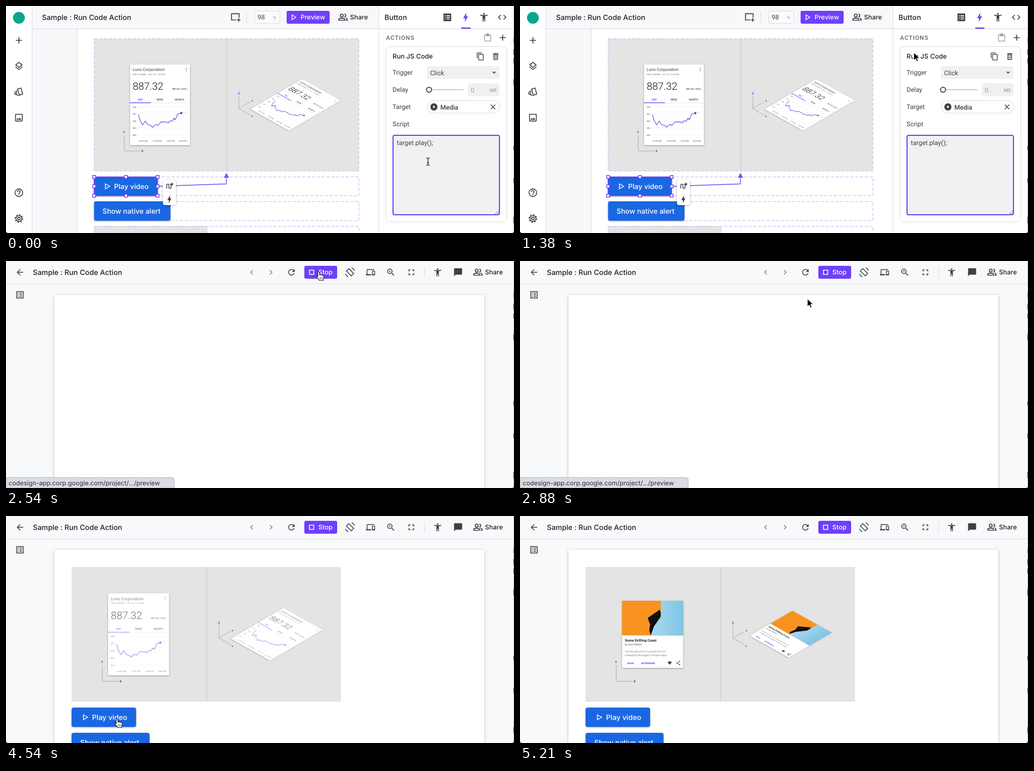
Animation of 945x423 px, one loop 5250 ms. Source, as an HTML page:

```html
<!DOCTYPE html>
<html lang="en">
<head>
<meta charset="utf-8">
<title>Run code action</title>
<style>
  html, body { margin: 0; width: 100%; height: 100%; overflow: hidden; background: #fff; }
  svg { display: block; width: 100vw; height: 100vh; }
  text { font-family: Roboto, sans-serif; fill: #3c4043; white-space: pre; text-rendering: geometricPrecision; }
  .ui { font-family: Inter, sans-serif; font-weight: 500; fill: #202124; }
  .white { fill: #fff; }
  .line { fill: none; stroke: #3c4043; stroke-width: 2; }
  .dash { fill: none; stroke: #c6b8f1; stroke-dasharray: 6 3; }
  .lift { filter: drop-shadow(0 1px 1.5px rgba(0,0,0,.35)); }
  .soft { filter: drop-shadow(0 1px 2px rgba(0,0,0,.28)); }
</style>
</head>
<body>
<svg id="stage" viewBox="0 0 945 423" preserveAspectRatio="none"></svg>
<script>
const LOOP = 5250;
const PURPLE = '#6f3ffb', HOVER = '#9059fb', BLUE = '#1a67e2', INK = '#3c4043', RULE = '#dadce0';

const icons = {
  add: 'M19 13h-6v6h-2v-6H5v-2h6V5h2v6h6z',
  layers: 'M12 18.5l-7.4-5.7L3 14l9 7 9-7-1.6-1.2zM12 16l7.4-5.7L21 9l-9-7-9 7 1.6 1.3zm0-11.5L17.7 9 12 13.5 6.3 9z',
  image: 'M19 5v14H5V5h14m0-2H5c-1.1 0-2 .9-2 2v14c0 1.1.9 2 2 2h14c1.1 0 2-.9 2-2V5c0-1.1-.9-2-2-2zm-4.9 8.9l-3 3.9L9 13.1 6 17h12z',
  help: 'M11 18h2v-2h-2zm1-16a10 10 0 1 0 0 20 10 10 0 0 0 0-20zm0 18a8 8 0 1 1 0-16 8 8 0 0 1 0 16zm0-14a4 4 0 0 0-4 4h2c0-1.1.9-2 2-2s2 .9 2 2c0 2-3 1.75-3 5h2c0-2.25 3-2.5 3-5a4 4 0 0 0-4-4z',
  bolt: 'M10 21l1-7H7c-.5 0-.4-.4 0-1l6-10h1l-1 7h3.5c.5 0 .6.3.4.7L11 21z',
  person: 'M20.5 6c-2.6.7-5.7 1-8.5 1s-5.9-.3-8.5-1L3 8c1.9.5 4 .8 6 1v13h2v-6h2v6h2V9c2-.2 4.1-.5 6-1zM12 6a2 2 0 1 0 0-4 2 2 0 0 0 0 4z',
  code: 'M9.4 16.6L4.8 12l4.6-4.6L8 6l-6 6 6 6zm5.2 0l4.6-4.6-4.6-4.6L16 6l6 6-6 6z',
  copy: 'M16 1H4c-1.1 0-2 .9-2 2v14h2V3h12zm3 4H8c-1.1 0-2 .9-2 2v14c0 1.1.9 2 2 2h11c1.1 0 2-.9 2-2V7c0-1.1-.9-2-2-2zm0 16H8V7h11z',
  trash: 'M15.5 4l-1-1h-5l-1 1H5v2h14V4zM6 7v12c0 1.1.9 2 2 2h8c1.1 0 2-.9 2-2V7zm2 2h8v10H8zm1.5 1.5v7h1.5v-7zm3.500 0v7h1.5v-7z',
  paste: 'M19 3h-4a3 3 0 0 0-6 0H5c-1.1 0-2 .9-2 2v15c0 1.100.9 2 2 2h14c1.100 0 2-.9 2-2V5c0-1.100-.9-2-2-2zm0 17H5V5h2v3h10V5h2z',
  list: 'M3 3h18v18H3zM6 7v2h2V7zm4 0v2h8V7zm-4 4v2h2v-2zm4 0v2h8v-2zm-4 4v2h2v-2zm4 0v2h8v-2z',
  listOutline: 'M3 3h18v18H3zm2 2v14h14V5zm2 2h2v2H7zm4 0h6v2h-6zm-4 4h2v2H7zm4 0h6v2h-6zm-4 4h2v2H7zm4 0h6v2h-6z',
  back: 'M20 11H7.8l5.600-5.600L12 4l-8 8 8 8 1.400-1.400L7.800 13H20z',
  prev: 'M15.4 7.4L14 6l-6 6 6 6 1.4-1.4-4.6-4.6z',
  next: 'M10 6L8.6 7.4l4.6 4.6-4.6 4.6L10 18l6-6z',
  refresh: 'M17.65 6.35A8 8 0 1 0 19.7 14h-2.100A6 6 0 1 1 16.200 7.800L13 11h7V4z',
  devices: 'M4 6h18V4H4c-1.1 0-2 .9-2 2v11H0v3h14v-3H4zm19 2h-6q-1 0-1 1v10q0 1 1 1h6q1 0 1-1V9q0-1-1-1zm-1 9h-4v-7h4z',
  zoom: 'M15.5 14h-.8l-.3-.3a6.500 6.500 0 1 0-.7.7l.3.3v.8l5 5 1.500-1.500zm-6 0a4.500 4.500 0 1 1 0-9 4.500 4.500 0 0 1 0 9zm2.500-4h-2v2H9v-2H7V9h2V7h1v2h2z',
  full: 'M7 14H5v5h5v-2H7zm-2-4h2V7h3V5H5zm12 7h-3v2h5v-5h-2zM14 5v2h3v3h2V5z',
  chat: 'M20 2H4c-1.1 0-2 .9-2 2v18l4-4h14c1.1 0 2-.9 2-2V4c0-1.1-.9-2-2-2z',
  close: 'M19 6.400L17.600 5 12 10.600 6.400 5 5 6.400 10.600 12 5 17.600 6.400 19 12 13.400 17.600 19 19 17.600 13.400 12z',
  play: 'M12 2a10 10 0 1 0 0 20 10 10 0 0 0 0-20zm-2 14.500v-9l6 4.500z',
  heart: 'M12 21C5 15 2 12 2 8.500A5.400 5.400 0 0 1 12 5a5.400 5.400 0 0 1 10 3.500C22 12 19 15 12 21z'
};

const at = (cx, cy, size, body) =>
  `<g transform="translate(${cx} ${cy}) scale(${size / 24}) translate(-12 -12)">${body}</g>`;
const icon = (name, cx, cy, size = 19, fill = INK) =>
  at(cx, cy, size, `<path d="${icons[name]}" fill="${fill}" fill-rule="evenodd"/>`);
const sketch = (cx, cy, size, d) => at(cx, cy, size, `<path class="line" d="${d}"/>`);
const rect = (x, y, w, h, fill, rest = '') =>
  `<rect x="${x}" y="${y}" width="${w}" height="${h}" fill="${fill}" ${rest}/>`;
const path = (d, rest) => `<path d="${d}" ${rest}/>`;
const txt = (x, y, s, size, rest = '') => `<text x="${x}" y="${y}" font-size="${size}" ${rest}>${s}</text>`;
const ui = (x, y, s, size, tone = '') => txt(x, y, s, size, `class="ui ${tone}"`);
const triangle = (x, y, w = 7, h = 9) =>
  path(`M${x} ${y - h / 2}l${w} ${h / 2}l${-w} ${h / 2}z`, 'fill="none" stroke="#fff" stroke-width="1.4"');
const stroke = (color, width = 1) => `fill="none" stroke="${color}" stroke-width="${width}"`;

const people = (x, y) => sketch(x, y, 19,
  'M9 11.500a3.500 3.500 0 1 0 0-7 3.500 3.500 0 0 0 0 7zM2 19v-2c0-4 14-4 14 0v2zM15 4.500a3.500 3.500 0 0 1 0 7M18 14c3 1 4 2 4 5h-4');
const gear = at(24, 396, 19, `<circle class="line" cx="12" cy="12" r="3"/><circle class="line" cx="12" cy="12" r="7"/>
  <circle class="line" cx="12" cy="12" r="9" style="stroke-dasharray:3.200 3.870"/>`);

// Card faces share one coordinate system; the slanted copy only differs by its matrix.
function stockFace() {
  const y = [888, 887, 886, 885, 884].map((n, i) => {
    const ly = 224.500 + i * 13.400;
    return txt(195, ly + 1.500, n, 4.2, 'style="fill:#666"') + path(`M205 ${ly}H299`, stroke('#eee', .6));
  }).join('');
  const hours = ['10:00 AM', '12:00 PM', '2:00 PM', '4:00 PM']
    .map((s, i) => txt([205, 232, 259, 282][i], 290.500, s, 4.300, 'style="fill:#666"')).join('');
  return txt(195, 156.500, 'Luno Corporation', 7.900) +
    txt(195, 164, 'MKTX: BORV • Oct 16, 1:32 PM', 4.500, 'style="fill:#777"') +
    [151, 153.500, 156].map(cy => `<circle cx="296.500" cy="${cy}" r=".7" fill="#555"/>`).join('') +
    txt(195, 192, '887.32', 19.300, 'font-weight="300" style="fill:#111"') +
    txt(298, 192, '887.02 (.03%)', 4.500, 'font-weight="500" text-anchor="end"') +
    txt(205, 212, 'DAY', 4.900, `font-weight="700" style="fill:${PURPLE}"`) +
    txt(240, 212, 'WEEK', 4.900, 'font-weight="500"') + txt(275, 212, 'MONTH', 4.900, 'font-weight="500"') +
    path('M190 217H303.500', stroke('#e4e4e4', .8)) + path('M190 216.500H229.500', stroke(PURPLE, 1.200)) + y + hours +
    path('M287 236L298 234', stroke('#ccc', .8)) +
    path('M206 239L208 247 211 254 214 258.500 219 251 223 258 229 259.500 233 263 239 257.500 243 259.500 248 253 259 253 262 255 266 250.500 270 251.500 273 246 276 248.500 280 238 287 236',
      stroke('#6a3de0', 1.100) + ' stroke-linejoin="round"') +
    `<circle cx="287" cy="236" r="2" fill="#5b2be0"/>`;
}

function articleFace() {
  return rect(190, 158, 113.500, 64.500, '#f7931e') +
    path('M262 158H303.500V222.500H243L249 204 262 187z', 'fill="url(#sky)"') +
    path('M237.500 190L260 174.500 262 181 261.500 188 249 206 243.500 222.500 240.500 214 242 202z', 'fill="#120f10"') +
    txt(195, 234, 'Some Drifting Coast', 6.500, 'font-weight="700" style="fill:#222"') +
    txt(195, 241, 'by Jost Feldner', 4.600) +
    txt(195, 253.500, 'Visit ten places on our planet that are', 4.600, 'style="fill:#777"') +
    txt(195, 260.500, 'undergoing the biggest changes today.', 4.600, 'style="fill:#777"') +
    txt(200, 276, 'READ', 4.700, `font-weight="700" style="fill:${PURPLE}"`) +
    txt(225.500, 276, 'BOOKMARK', 4.700, `font-weight="700" style="fill:${PURPLE}"`) +
    icon('heart', 278.500, 274, 8, '#444') +
    path('M297 271L292 274 297 277', stroke('#444', .9)) +
    [[297, 271], [292, 274], [297, 277]].map(p => `<circle cx="${p[0]}" cy="${p[1]}" r="1.100" fill="#444"/>`).join('');
}

const card = matrix => `<g transform="${matrix}">
  <rect class="paper lift" x="-56.750" width="113.500" rx="1" fill="#fff"/>
  <g transform="translate(-246.750 -220.500)"><g class="stock">${stockFace()}</g><g class="article">${articleFace()}</g></g></g>`;

const media = `<g id="media">${rect(122, 95, 501, 251, '#e4e4e4')}
  ${path('M373.500 95V346', stroke('#c8c8c8'))}
  ${path('M179 278V308H210', stroke('#aaa'))}
  ${txt(177, 274, 'Y', 5.500, 'font-weight="700"')}${txt(211.500, 310, 'X', 5.500, 'font-weight="700"')}
  ${path('M396 204V227.500L418 214.500M396 227.500L418 240', stroke('#aaa', .9))}
  ${txt(394.500, 200.500, 'Z', 5.500, 'font-weight="700" style="fill:#3d35e8"')}
  ${txt(420, 214.500, 'x', 5, 'font-weight="700"')}${txt(419.500, 243.500, 'x', 5, 'font-weight="700"')}
  ${card('translate(246.750 220.500)')}${card('matrix(.643 .361 -.64 .375 503.500 220.300)')}</g>`;

const handle = (x, y) => rect(x - 2.750, y - 2.750, 5.500, 5.500, '#fff', `stroke="${PURPLE}" stroke-width="1.400"`);
const handles = [164, 223, 282].map(x => [318.500, 336, 353.500]
  .map(y => x === 223 && y === 336 ? '' : handle(x, y)).join('')).join('');

const editor = `<g id="editor">
  ${rect(0, 0, 945, 423, '#fff')}${rect(49, 0, 645, 423, '#f8f8fb')}${rect(132, 43, 562, 380, '#fff')}
  ${path('M48.500 0V423M132.500 43V423M693.500 0V423M49 42.500H945', stroke(RULE))}
  <circle cx="24" cy="22" r="11" fill="#0aa68c"/>
  ${icon('add', 24, 64, 20)}${icon('layers', 24, 112)}${icon('image', 24, 208)}${icon('help', 24, 348)}${gear}
  ${sketch(24, 160, 19, 'M9 5l8-2 4 14-8 3zM7 8l-1 10 5 3M4 10l-2 6 3 3')}
  ${ui(67, 26, 'Sample : Run Code Action', 13.400)}
  ${sketch(427, 21, 20, 'M13 18H3V4h17v9M19 14v8M15 18h8')}
  ${path('M447.500 11V31', stroke(RULE))}
  ${rect(462.500, 9.500, 47, 23, '#fbfbfd', `rx="3" stroke="${RULE}"`)}
  ${txt(468, 25, '98', 12)}${txt(497, 24, '%', 7.500, 'style="fill:#80868b"')}
  ${rect(522, 9, 80, 24, PURPLE, 'id="previewButton" rx="3"')}${triangle(532, 21)}${ui(548, 25, 'Preview', 12, 'white')}
  ${people(627, 21)}${ui(640, 25, 'Share', 12)}

  ${rect(164, 410, 211, 14, '#e4e4e4')}
  <g id="editorMedia" transform="translate(164 61) scale(.982) translate(-122 -95)"></g>
  ${[[61, 246.500], [318.500, 35], [364.500, 35.500], [410.500, 40]].map(r => rect(164, r[0], 492.500, r[1], 'none', 'class="dash"')).join('')}
  ${path('M285 336L316 334.800 410 331.500V319', stroke('#7b50f0', 1.400))}${path('M410 311l5 9h-10z', 'fill="#7b50f0"')}
  <g class="lift">${rect(164, 318, 118, 36, BLUE, 'rx="3"')}${rect(164, 364, 142, 36, BLUE, 'rx="4"')}</g>
  ${triangle(185, 336, 8, 9)}${ui(201, 341, 'Play video', 13.100, 'white')}
  ${ui(179.500, 387, 'Show native alert', 13.100, 'white')}
  ${rect(164, 318.500, 118, 35, 'none', `stroke="${PURPLE}" stroke-width="1.400"`)}${handles}
  ${rect(292, 324, 24, 47, '#fff', 'rx="4" class="soft"')}${icon('bolt', 304, 360, 17)}
  ${path('M299 340v-6a2 2 0 0 1 4 0v4a2 2 0 0 0 4 0v-6M304.500 332h5M308 329.500l2.500 2.500-2.500 2.500', stroke(INK, 1.400))}

  ${ui(704, 26, 'Button', 13.400)}${icon('list', 821, 21)}${icon('bolt', 855, 21, 20, PURPLE)}
  ${rect(847, 40, 17, 2.500, PURPLE)}${icon('person', 889, 21)}${icon('code', 923, 21)}
  ${txt(707, 63, 'ACTIONS', 11, 'letter-spacing="1" font-weight="500" style="fill:#5f6368"')}
  ${icon('paste', 896, 59, 17, '#9aa0a6')}${icon('add', 924, 59)}
  ${rect(706.500, 75.500, 225, 327, '#fff', `rx="8" stroke="${RULE}"`)}
  ${ui(719, 98, 'Run JS Code', 12.200)}${icon('copy', 882.500, 94, 16)}${icon('trash', 911, 94, 17)}
  ${[['Trigger', 128], ['Delay', 160], ['Target', 192], ['Script', 224]].map(r => txt(719, r[1], r[0], 12)).join('')}
  ${rect(783, 112, 135, 24, '#f0f0f2', 'rx="3"')}${txt(789, 128.500, 'Click', 12)}${path('M904 122.500h8l-4 4z', 'fill="#5f6368"')}
  ${path('M792 156H851', stroke('#bdc1c6', 1.500))}<circle cx="787" cy="156" r="4.700" fill="#fff" stroke="${INK}" stroke-width="1.800"/>
  ${rect(859, 144, 59, 24, '#f0f0f2', 'rx="3"')}${txt(864.500, 160.500, '0', 12, 'style="fill:#9aa0a6"')}
  ${txt(900, 159.500, 'MS', 8.500, 'style="fill:#80868b"')}
  ${rect(783.500, 176.500, 135, 23, '#fff', `rx="11.500" stroke="${RULE}"`)}${icon('play', 796, 188, 16)}
  ${txt(808, 192.500, 'Media', 12, 'font-weight="500"')}${icon('close', 906, 188, 16)}
  ${rect(720, 241, 198, 148, '#f1f1f3', `rx="3" stroke="${PURPLE}" stroke-width="2"`)}
  ${txt(727, 258.500, 'target.play();', 12)}${path('M910 388l7-7M914 388l3-3', stroke('#666'))}
</g>`;

const viewer = `<g id="viewer">
  ${rect(0, 0, 945, 423, '#f8f9fb')}${path('M0 42.500H945', stroke(RULE))}
  ${icon('back', 26, 21, 18)}${ui(50, 26, 'Sample : Run Code Action', 13.400)}${icon('listOutline', 26, 63, 18)}
  ${icon('prev', 457, 21, 18, '#80868b')}${icon('next', 493, 21, 18, '#80868b')}${icon('refresh', 531, 21, 18)}
  ${rect(555, 9, 61, 24, PURPLE, 'rx="3"')}${rect(564.500, 17, 8, 8, 'none', 'stroke="#fff" stroke-width="1.500"')}
  ${ui(581, 25, 'Stop', 12, 'white')}
  ${sketch(640, 21, 18, 'M9 3l12 12-6 6L3 9zM16 1c4 1 6 4 7 7M8 23c-4-1-6-4-7-7')}
  ${icon('devices', 678, 21, 17)}${icon('zoom', 716, 21, 18)}${icon('full', 754, 21, 18)}
  ${path('M778.500 11V31', stroke(RULE))}${icon('person', 803, 21, 18)}${icon('chat', 841, 21, 18)}
  ${people(878, 21)}${ui(891, 25, 'Share', 12)}
  ${rect(90, 63, 800, 370, '#fff', 'class="soft"')}
  <g id="page"><g id="viewerMedia"></g>
    <g class="lift">${rect(122, 357, 120, 36, BLUE, 'rx="4"')}${rect(122, 404, 145, 36, BLUE, 'rx="4"')}</g>
    ${triangle(144, 375, 8, 9)}${ui(160, 380, 'Play video', 13.300, 'white')}
    ${ui(138, 427, 'Show native alert', 13.300, 'white')}</g>
</g>`;

const windowEdge = path('M944.500 0V423', stroke('#c4c4c8')) +
  path('M944.500 80v11M944.500 98v9M944.500 136v12M944.500 261v8M944.500 321v9M944.500 393v12', stroke('#333')) +
  path('M944.500 59v10', stroke('#3b6fd8')) + path('M0 419v4h4q-4 0-4-4M945 419v4h-4q4 0 4-4', 'fill="#111"');

const status = `<g id="status">${path('M0 403.500H308q5 0 5 5V423H0z', 'fill="#d9dde3" stroke="#b4b7bc"')}
  ${txt(5, 418, 'codesign-app.corp.google.com/project/.../preview', 11.800, 'style="font-family:Inter,sans-serif;fill:#2b2d30"')}</g>`;

// Each pointer is drawn around its hot spot.
const cursors = `<g id="cursor">
  <g id="beam">${path('M-3.500-7q3.500 0 3.500 2.500V4.500Q0 7-3.500 7M3.500-7Q0-7 0-4.500V4.500Q0 7 3.500 7M-2 2H2', stroke('#111', 1.200))}</g>
  <g id="arrow">${path('M0 0V14.500l3.400-3.200 2.200 5.200 2.600-1.100-2.200-5.100h4.700z', 'fill="#000" stroke="#fff" stroke-width="1"')}</g>
  <g id="hand">${path('M-1.500 .5Q0-1 1.500 .5L2.300 6q1.500-1.300 2.600.2 1.600-1 2.500.5 2-.6 2.600 1.300c.6 3 .2 4-.8 5.500V16H1.500C0 13-3 11-3.500 8.500q.8-1.500 2.800.5z',
    'fill="#fff" stroke="#111" stroke-width="1.100" stroke-linejoin="round"')}${path('M3 10.500v3M5 10.500v3M7 10.500v3', stroke('#111', .8))}</g></g>`;

const stage = document.getElementById('stage');
stage.innerHTML = `<defs><linearGradient id="sky" x1="0" x2="1"><stop stop-color="#a9daee"/><stop offset="1" stop-color="#7fc4e6"/></linearGradient></defs>
  ${editor}${viewer}${media}${windowEdge}${status}${cursors}`;

const get = id => document.getElementById(id);
const all = selector => [...stage.querySelectorAll(selector)];
const show = (id, on) => { get(id).style.display = on ? '' : 'none'; };
const papers = all('.paper'), stocks = all('.stock'), articles = all('.article');
const mediaNode = get('media');

// time, x, y
const route = [
  [0, 785, 290], [850, 785, 290], [1130, 764, 190], [1380, 733, 87], [1650, 615, 45], [1800, 581, 20],
  [2780, 581, 20], [3000, 480, 130], [3330, 215, 362], [3480, 196, 387], [3900, 196, 387],
  [4150, 206, 378], [4920, 206, 378], [5140, 204, 432]
];
const ramp = (t, a, b) => Math.min(1, Math.max(0, (t - a) / (b - a)));
const ease = p => p * p * (3 - 2 * p);
const inside = (x, y, l, t, r, b) => x >= l && x <= r && y >= t && y <= b;

function pointer(t) {
  const i = route.findIndex(k => k[0] > t);
  if (i < 0) return route[route.length - 1].slice(1);
  const [a, b] = [route[i - 1], route[i]], p = ramp(t, a[0], b[0]);
  return [a[1] + (b[1] - a[1]) * p, a[2] + (b[2] - a[2]) * p];
}

function draw(t) {
  const viewing = t >= 2300, loaded = t >= 2900;
  show('editor', !viewing);
  show('viewer', viewing);
  show('page', loaded);
  show('status', t >= 1950 && t < 2950);
  const home = get(viewing ? 'viewerMedia' : 'editorMedia');
  if (mediaNode.parentNode !== home) home.appendChild(mediaNode);

  const half = 76.500 - 14 * ease(ramp(t, 4640, 4860));
  papers.forEach(n => { n.setAttribute('y', -half); n.setAttribute('height', 2 * half); });
  stocks.forEach(n => n.setAttribute('opacity', 1 - ramp(t, 4430, 4700)));
  articles.forEach(n => n.setAttribute('opacity', ramp(t, 4800, 5080)));

  const [x, y] = pointer(t);
  const onPreview = !viewing && inside(x, y, 522, 9, 602, 33);
  const onButton = viewing && (inside(x, y, 555, 9, 616, 33) || inside(x, y, 122, 357, 242, 393) || inside(x, y, 122, 404, 267, 440));
  const kind = !viewing && inside(x, y, 719, 240, 919, 390) ? 'beam' : onPreview || onButton ? 'hand' : 'arrow';
  ['beam', 'arrow', 'hand'].forEach(k => show(k, k === kind));
  get('cursor').setAttribute('transform', `translate(${x} ${y})`);
  get('previewButton').setAttribute('fill', onPreview ? HOVER : PURPLE);
}

const start = performance.now();
function tick() {
  draw((performance.now() - start) % LOOP);
  requestAnimationFrame(tick);
}
tick();
</script>
</body>
</html>
```
